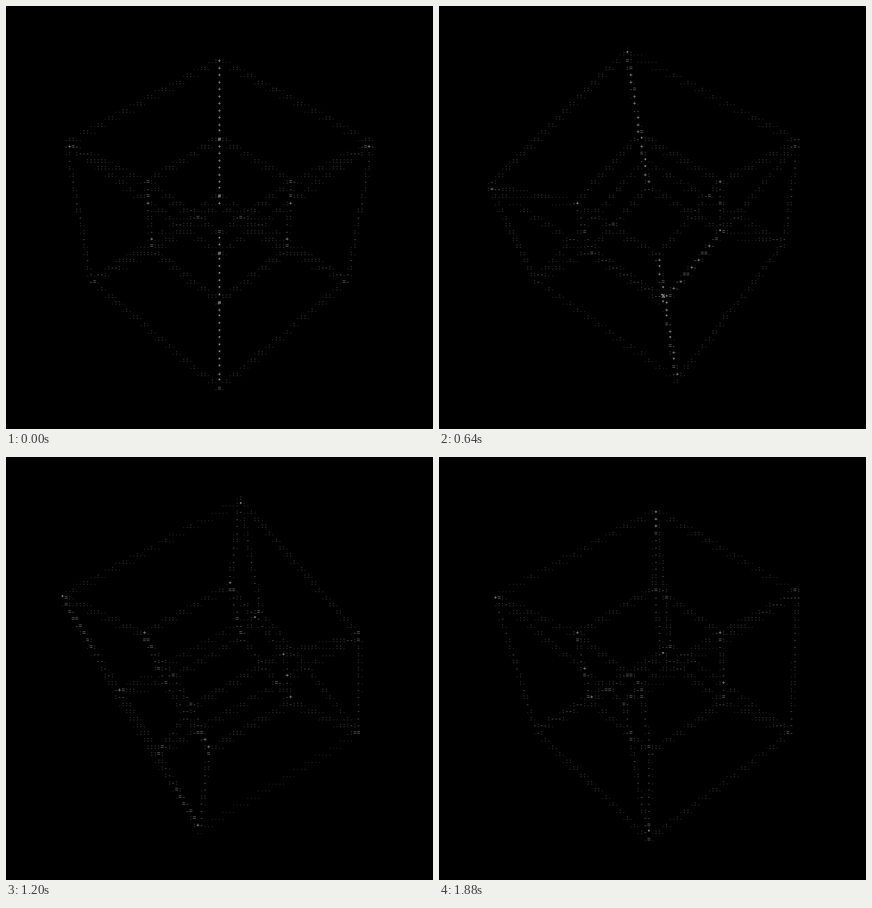
Recreate the animation shown at these times as an HTML page with a canvas. Size 751x745 px, loop 1.92 s.

```html
<!DOCTYPE html>
<html lang="en">
<head>
<meta charset="utf-8">
<title>ASCII tesseract</title>
<style>
  html, body { margin: 0; width: 100%; height: 100%; overflow: hidden; background: #000; }
  canvas { display: block; }
</style>
</head>
<body>
<canvas id="stage" width="751" height="745"></canvas>
<script>
const STEPS = 48, STEP_MS = 40;
const COLS = 120, ROWS = 60;
const CELL_W = 6.27, CELL_H = 12.54;
const MID_COL = 59, MID_ROW = 29;
const MID_X = 375.3, MID_Y = 372.9;
const SUB_X = 4, SUB_Y = 8;              // buffer pixels per cell
const BUF_W = COLS * SUB_X, BUF_H = ROWS * SUB_Y;
const SIZE_X = 173.5, SIZE_Y = 169.5;    // half edge of the outer cube
const GAIN = 31.5, LINE = 1.3;
const RAMP = " .:-=+*#%@";
const ALPHA = { outer: 0.28, inner: 0.345, link: 0.34 };

const out = document.getElementById("stage").getContext("2d");
const bufCanvas = document.createElement("canvas");
bufCanvas.width = BUF_W;
bufCanvas.height = BUF_H;
const buf = bufCanvas.getContext("2d", { willReadFrequently: true });

// Cube axes after a 45 degree roll and a 45 degree tilt
const R = Math.SQRT1_2;
const AXES = [[R, -0.5, -0.5], [-R, -0.5, -0.5], [0, R, -R]];

// Bits 0-2 choose the cube corner, bit 3 the inner cube
function project(id, angle) {
  const [x, y, z] = [0, 1, 2].map(k =>
    AXES.reduce((sum, axis, i) => sum + (id >> i & 1 ? axis[k] : -axis[k]), 0));
  const c = Math.cos(angle), s = Math.sin(angle);
  const size = id & 8 ? 0.5 : 1;
  const depth = size * (z * c - x * s) / 2;
  const scale = size / (1 - depth / 4);
  return {
    x: (MID_COL + 0.5 + (x * c + z * s) * scale * SIZE_X / CELL_W) * SUB_X,
    y: (MID_ROW + 0.5 + y * scale * SIZE_Y / CELL_H) * SUB_Y,
    depth
  };
}

function drawWire(angle) {
  buf.fillStyle = "#000";
  buf.fillRect(0, 0, BUF_W, BUF_H);
  buf.lineWidth = LINE;
  const pts = Array.from({ length: 16 }, (_, id) => project(id, angle));
  for (let a = 0; a < 16; a++) {
    for (let bit = 1; bit < 16; bit <<= 1) {
      if (a & bit) continue;
      const p = pts[a], q = pts[a | bit];
      const kind = bit === 8 ? "link" : a & 8 ? "inner" : "outer";
      const alpha = ALPHA[kind] * (1 + 0.08 * (p.depth + q.depth) / 2);
      buf.strokeStyle = `rgba(255,255,255,${alpha})`;
      buf.beginPath();
      buf.moveTo(p.x, p.y);
      buf.lineTo(q.x, q.y);
      buf.stroke();
    }
  }
}

function cubic(d) {
  d = Math.abs(d);
  if (d < 1) return (1.5 * d - 2.5) * d * d + 1;
  return d < 2 ? ((-0.5 * d + 2.5) * d - 4) * d + 2 : 0;
}

// Filter taps around the middle of a cell, in buffer pixels
function makeTaps(sub) {
  const taps = [];
  for (let i = -1.5 * sub; i < 2.5 * sub; i++) {
    taps.push([i, cubic((i + 0.5) / sub - 0.5) / sub]);
  }
  return taps;
}
const TAPS_X = makeTaps(SUB_X), TAPS_Y = makeTaps(SUB_Y);

function shrink() {
  const px = buf.getImageData(0, 0, BUF_W, BUF_H).data;
  const mid = new Float32Array(COLS * BUF_H);
  for (let y = 0; y < BUF_H; y++) {
    for (let c = 0; c < COLS; c++) {
      let sum = 0;
      for (const [i, w] of TAPS_X) {
        const x = c * SUB_X + i;
        if (x >= 0 && x < BUF_W) sum += w * px[(y * BUF_W + x) * 4];
      }
      mid[y * COLS + c] = sum;
    }
  }
  const cells = [];
  for (let r = 0; r < ROWS; r++) {
    for (let c = 0; c < COLS; c++) {
      let sum = 0;
      for (const [i, w] of TAPS_Y) {
        const y = r * SUB_Y + i;
        if (y >= 0 && y < BUF_H) sum += w * mid[y * COLS + c];
      }
      const level = Math.min(9, Math.round(sum / 255 * GAIN));
      if (level > 0) cells.push([c, r, level]);
    }
  }
  return cells;
}

const cache = [];
function cellsAt(step) {
  if (!cache[step]) {
    drawWire(step / STEPS * 2 * Math.PI);
    cache[step] = shrink();
  }
  return cache[step];
}

function paint(step) {
  out.fillStyle = "#000";
  out.fillRect(0, 0, 751, 745);
  out.font = '10.45px "Liberation Mono", monospace';
  out.textAlign = "center";
  for (const [c, r, level] of cellsAt(step)) {
    const g = Math.min(255, 22 + 29 * level);
    out.fillStyle = `rgb(${g},${g},${g})`;
    out.fillText(RAMP[level],
      MID_X + (c - MID_COL) * CELL_W,
      MID_Y + (r - MID_ROW) * CELL_H + 3);
  }
}

const start = performance.now();
let shown = -1;
function tick() {
  const step = Math.floor((performance.now() - start) / STEP_MS) % STEPS;
  if (step !== shown) paint(shown = step);
  requestAnimationFrame(tick);
}
tick();
</script>
</body>
</html>
```
